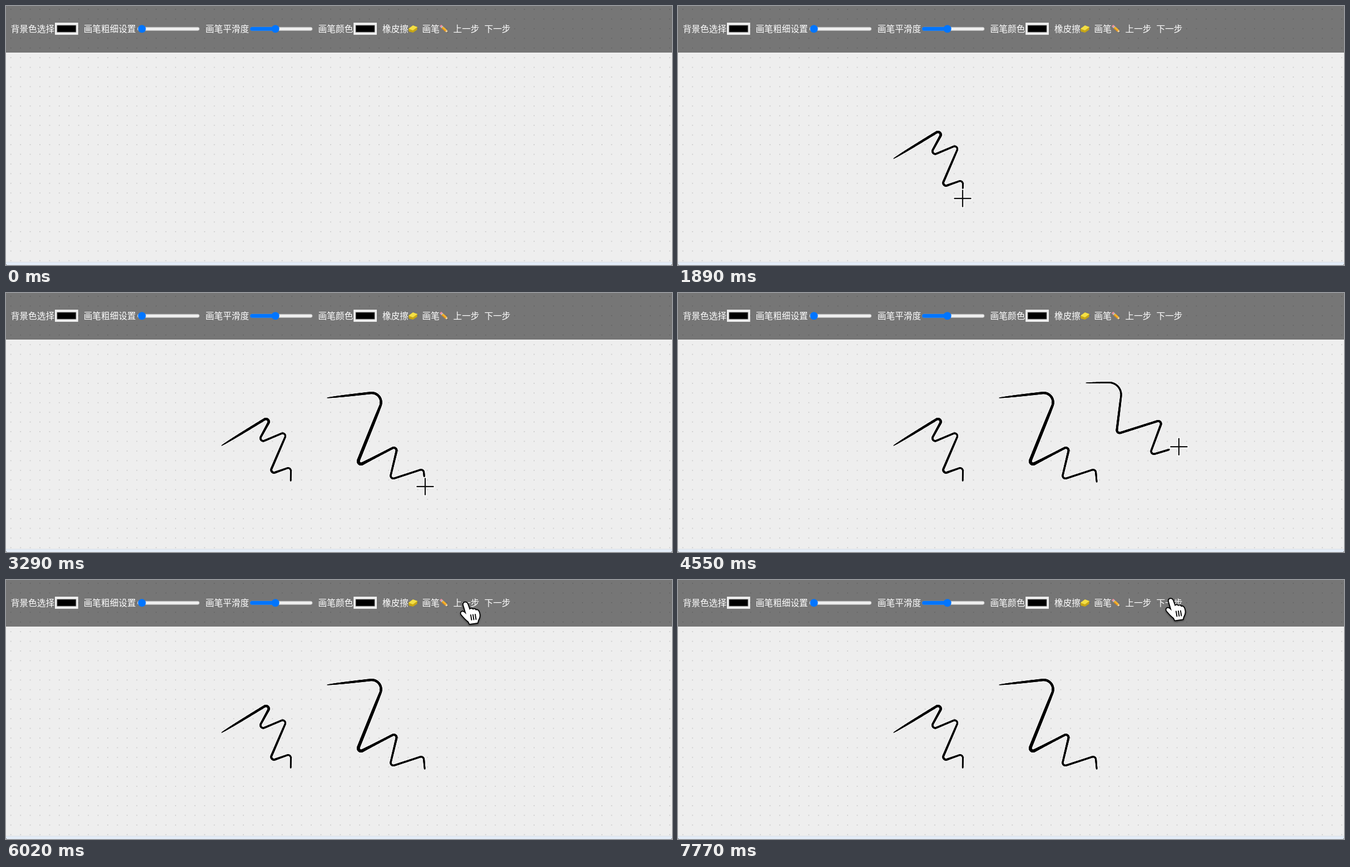
An HTML page with a canvas that plays this animation: 1198x467 px, repeating every 8000 ms.

```html
<!DOCTYPE html>
<html lang="zh-CN">
<head>
<meta charset="utf-8">
<title>画板</title>
<style>
  html, body { margin: 0; width: 100%; height: 100%; overflow: hidden; background: #555; }
  #stage { position: relative; width: 1198px; height: 467px; overflow: hidden; border-radius: 3px; }
  svg, canvas { position: absolute; left: 0; top: 0; display: block; }
  text { font: 15.7px "Noto Sans CJK SC", "Noto Sans CJK", sans-serif; fill: #fff; }
</style>
</head>
<body>
<div id="stage">
  <svg width="1198" height="467" viewBox="0 0 1198 467">
    <defs>
      <pattern id="dots" y="-2.7" width="17.43" height="17.43" patternUnits="userSpaceOnUse">
        <circle cx="8.7" cy="8.7" r=".8" fill="#aaa"/>
      </pattern>
      <g id="swatch">
        <rect width="41.8" height="21.8" fill="#efefef"/>
        <rect x="3.9" y="4.8" width="34" height="12.2" stroke="#777" stroke-width=".9"/>
      </g>
      <rect id="track" width="111.600" height="6.100" rx="3" fill="#efefef" stroke="#b2b2b2" stroke-width=".9"/>
    </defs>
    <rect width="1198" height="467" fill="#eee"/>
    <rect width="1198" height="467" fill="url(#dots)"/>
    <rect y="462" width="1198" height="5" fill="#e4edf8"/>
    <rect y="461.5" width="1198" height="1" fill="#d9e0e8"/>
    <rect width="1198" height="84" fill="#000" fill-opacity=".5"/>

    <text x="8.7" y="46.7">背景色选择</text>
    <use href="#swatch" x="88" y="30.1"/>
    <text x="139.700" y="46.7">画笔粗细设置</text>
    <use href="#track" x="236.3" y="38.200"/>
    <text x="358.800" y="46.7">画笔平滑度</text>
    <use href="#track" x="439.5" y="38.200"/>
    <g fill="#0075ff">
      <circle cx="244.5" cy="41.2" r="7"/>
      <rect x="439.1" y="37.7" width="46" height="7" rx="3.5"/>
      <circle cx="484.6" cy="41.2" r="7"/>
    </g>
    <text x="561.600" y="46.7">画笔颜色</text>
    <use href="#swatch" x="625.2" y="30.1"/>
    <text x="677" y="46.7">橡皮擦</text>
    <path d="M724 41 732 35 740 38 739.5 43 732 48 724.5 46Z" fill="#c7a616"/>
    <path d="M724 41 732 35 740 38 732 44Z" fill="#f3df45"/>
    <text x="748.5" y="46.7">画笔</text>
    <g transform="translate(781.5 35) rotate(43)">
      <rect y="-2" width="4" height="4.4" rx="1.2" fill="#ef8e9c"/>
      <rect x="3" y="-2" width="2" height="4.4" fill="#b9c0c4"/>
      <rect x="5" y="-2" width="9" height="4.4" fill="#f6b32d"/>
      <rect x="5" y="1" width="9" height="1.4" fill="#d98a1c"/>
      <path d="M14-2 18.7.3 14 2.4Z" fill="#f0d3a2"/>
      <path d="M17-.6 19 .3 17 1.1Z" fill="#333"/>
    </g>
    <text x="804.5" y="46.7">上一步</text>
    <text x="860.5" y="46.7">下一步</text>
  </svg>
  <canvas id="ink" width="1198" height="467"></canvas>
</div>
<script>
const ctx = document.getElementById('ink').getContext('2d');
const LOOP = 8000, STEP = 70;
const CORNER = 5;   // usual corner radius
const LAG = 18;     // ink trails the cursor by this length while drawing
const always = () => true;

// Straight runs between key points with rounded corners; "bend" rounds the first corner.
function route(points, bend) {
  const el = document.createElementNS('http://www.w3.org/2000/svg', 'path');
  const toward = ([x, y], [p, q]) => {
    const d = Math.hypot(p - x, q - y);
    return [(p - x) / d, (q - y) / d];
  };
  let d = 'M' + points[0];
  const ends = [];
  points.slice(1).forEach((c, i) => {
    const next = points[i + 2];
    if (next) {
      const r = i ? CORNER : bend;
      const u = toward(c, points[i]), v = toward(c, next);
      const cut = r / Math.tan(Math.acos(u[0] * v[0] + u[1] * v[1]) / 2);
      const along = w => [c[0] + cut * w[0], c[1] + cut * w[1]];
      const sweep = u[0] * v[1] - u[1] * v[0] < 0 ? 1 : 0;
      d += `L${along(u)}A${r} ${r} 0 0 ${sweep} ${along(v)}`;
    } else d += 'L' + c;
    el.setAttribute('d', d);
    ends.push(el.getTotalLength());
  });
  const length = el.getTotalLength();
  const at = s => {
    const p = el.getPointAtLength(s);
    return [p.x, p.y];
  };
  return { length, ends, at };
}

// Longer runs are drawn faster and leave a wider line; the width follows gradually.
function penWidths(points, path) {
  const widths = [];
  let w = 1;
  for (let s = 0, run = 0; s <= path.length; s++) {
    if (s > path.ends[run]) run++;
    const [a, b] = points.slice(run, run + 2);
    w += (1.5 + 0.026 * Math.hypot(b[0] - a[0], b[1] - a[1]) - w) / 25;
    widths.push(w);
  }
  return widths;
}

const move = (from, to, bend, ...points) => ({ from, to, path: route(points, bend) });

function stroke({ from, to, done, bend = CORNER, gap = 8, shown = always, points }) {
  const path = route(points, bend);
  return { from, to, done, gap, shown, path, widths: penWidths(points, path) };
}

const strokes = [
  stroke({ from: 1120, to: 1890, done: 2100,
    points: [[388, 275], [481, 218], [451.5, 272], [507, 248.5], [473, 327.5], [512.5, 313.5], [512, 347]] }),
  stroke({ from: 2590, to: 3290, done: 3570, bend: 17, shown: t => t < 6720 || t >= 7770,
    points: [[578, 189], [684, 177], [629, 314], [705, 274.5], [690, 337], [751, 317], [754, 349]] }),
  stroke({ from: 3990, to: 4690, done: 4970, bend: 22, gap: 32, shown: t => t < 6020,
    points: [[734, 162], [800, 161], [788.5, 254.5], [872, 228], [848, 293], [910, 274.5], [897, 336], [923, 317]] })
];

const legs = [
  ...strokes,
  move(140, 560, 60, [551, 480], [480, 350], [386, 276]),
  move(2030, 2450, 10, [512, 347], [588, 190], [578, 189]),
  move(3500, 3850, 60, [754, 349], [757, 220], [734, 162]),
  move(4900, 5600, 60, [923, 317], [870, 110], [828, 20], [827, 41]),
  move(6930, 7630, 20, [827, 41], [850, 48], [894, 40], [887, 34.5])
].sort((a, b) => a.from - b.from);

const progress = (leg, t) => Math.min(1, (t - leg.from) / (leg.to - leg.from));

function drawStroke(s, t) {
  if (t <= s.from || !s.shown(t)) return;
  const full = s.path.length - s.gap;
  const tip = t >= s.done ? full : Math.min(full, s.path.length * progress(s, t) - LAG);
  let p = s.path.at(0);
  for (let d = 1; d <= tip; d++) {
    const q = s.path.at(d);
    ctx.lineWidth = s.widths[d];
    ctx.beginPath();
    ctx.moveTo(...p);
    ctx.lineTo(...q);
    ctx.stroke();
    p = q;
  }
}

function cursorAt(t) {
  const leg = legs.filter(l => t > l.from).pop();
  if (!leg) return null;
  const p = progress(leg, t);
  return leg.path.at(leg.path.length * (leg.widths ? p : p * (2 - p)));
}

function drawCross(x, y) {
  const plus = (r, w, color) => {
    ctx.fillStyle = color;
    ctx.fillRect(x - r, y - w / 2, 2 * r, w);
    ctx.fillRect(x - w / 2, y - r, w, 2 * r);
  };
  plus(17, 5.5, '#fff');
  plus(15.5, 2.3, '#111');
}

const hand = new Path2D('M-4 4C-5-1 1-2 3 2L7 13C8 10 12 10 13 13C14 11 17 11 18 14' +
  'C20 12 23 14 24 18C26 24 24 28 22 32L21 36 7 38 5 34C1 31-3 27-7 22C-11 17-6 14-2 18L1 21Z');
const creases = new Path2D('M9 22 10.5 31M13 21.5 14.5 30.500M17 21 18.500 30');

function drawHand(x, y) {
  ctx.save();
  ctx.translate(x, y);
  ctx.shadowColor = 'rgba(0,0,0,.5)';
  ctx.shadowBlur = 3;
  ctx.shadowOffsetY = 1.5;
  ctx.lineWidth = 3.6;
  ctx.stroke(hand);
  ctx.shadowColor = 'transparent';
  ctx.fillStyle = '#fff';
  ctx.fill(hand);
  ctx.lineWidth = 1.8;
  ctx.stroke(creases);
  ctx.restore();
}

function frame() {
  const t = Math.floor(performance.now() % LOOP / STEP) * STEP;
  ctx.clearRect(0, 0, 1198, 467);
  strokes.forEach(s => drawStroke(s, t));
  const c = cursorAt(t);
  if (c) (c[1] > 26 && c[1] < 56 ? drawHand : drawCross)(...c);
  requestAnimationFrame(frame);
}

ctx.strokeStyle = '#000';
ctx.lineCap = ctx.lineJoin = 'round';
frame();
</script>
</body>
</html>
```
